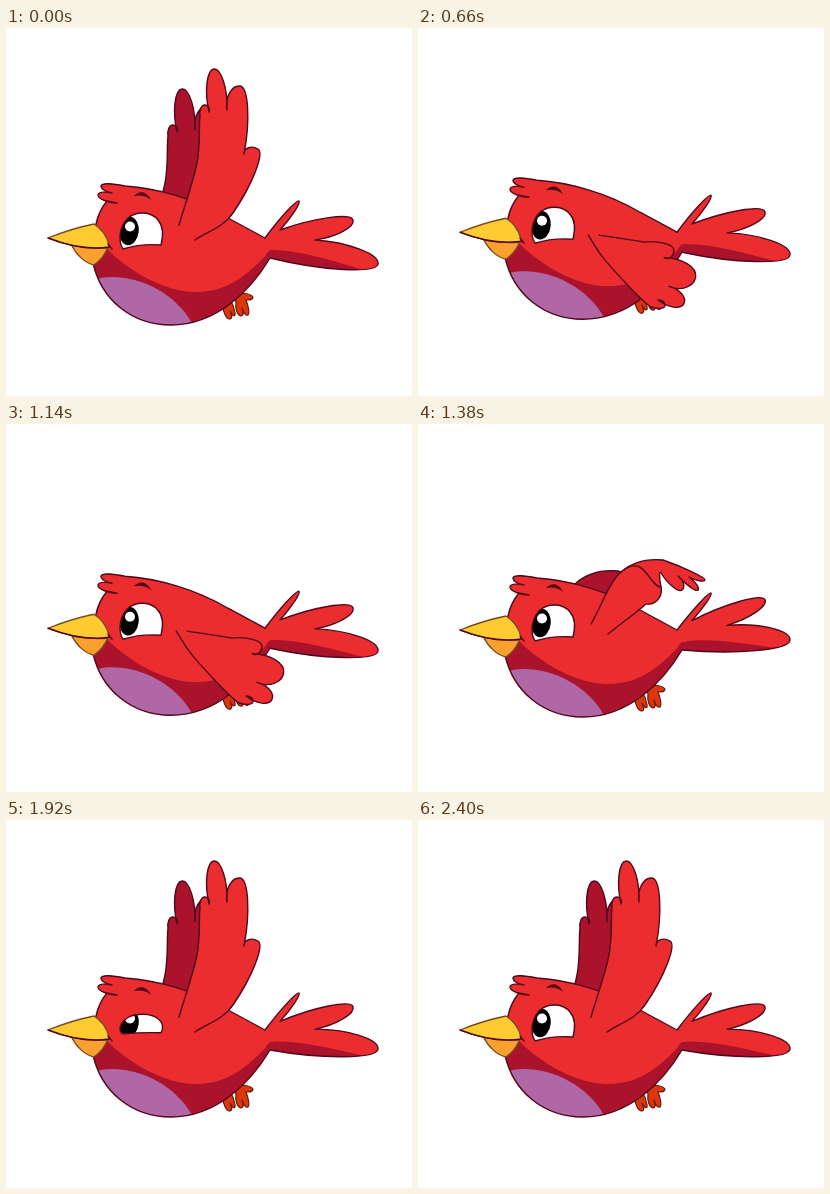
Animation of 406x368 px, one loop 2.43 s. Source, as an HTML page:

```html
<!DOCTYPE html>
<html lang="en">
<head>
<meta charset="utf-8">
<title>Flying bird</title>
<style>
html, body { margin: 0; width: 100%; height: 100%; overflow: hidden; background: #fff; }
svg { display: block; width: 100vw; height: 100vh; }
.line { stroke: #50081c; stroke-width: 1.4; stroke-linejoin: round; stroke-linecap: round; }
.red { fill: #eb2d2f; }
.dark { fill: #ab122c; }
.none { fill: none; }
.beak { stroke: #75491f; stroke-width: 1.3; stroke-linejoin: round; }
.foot { fill: #dc360c; stroke: #64180c; stroke-width: 1.2; stroke-linejoin: round; }
</style>
</head>
<body>
<svg viewBox="0 0 406 368">
  <defs>
    <path id="torso" d="M264 230C245 262 211 297 165 297C125 297 95 271 87 235L90 196C92 186 96 179 101 173
      L111 175C103 175 92 171 92 167C92 164 100 163 106 165C100 164 95 161 95 158C96 154 108 156 119 158
      C151 160 190 171 222 190L259 210"/>
    <clipPath id="inBody"><use href="#torso"/></clipPath>
    <clipPath id="inTail"><path class="tail"/></clipPath>
    <clipPath id="inEye"><path class="eye"/></clipPath>
  </defs>
  <path id="far" class="dark line"/>
  <g id="bird">
    <path class="foot" d="M225 274C220 276 217 279 217 281C218 284 219 290 223 291C227 291 226 287 224 283C226 286 227 289 229 287C230 284 227 280 227 277Z"/>
    <path class="foot" d="M229 268C235 264 244 265 247 269C247 272 244 272 240 272C242 277 244 285 242 287C239 288 237 284 236 280C237 285 238 288 235 288C231 287 229 280 230 275Z"/>
    <path class="tail red"/>
    <path id="tailShade" class="dark" clip-path="url(#inTail)"/>
    <use href="#torso" class="red"/>
    <g clip-path="url(#inBody)">
      <path class="dark" d="M101 221C125 245 160 264 190 264C225 264 245 243 264 223V300H80L85 233Z"/>
      <path fill="#af68a5" d="M90 251C120 243 167 259 187 297L160 305L85 280Z"/>
    </g>
    <path class="red" d="M252 212L259 210L266 209L268 222L262 223Z"/>
    <path class="dark" d="M260 226L264 222L269 222L268 230L264 230Z"/>
    <use href="#torso" class="none line"/>
    <path class="tail none line"/>
    <path class="beak" fill="#f9a02e" d="M65 216C70 227 79 235 88 237C95 232 99 227 102 219Z"/>
    <path class="beak" fill="#ffcb33" d="M42 210C57 204 73 199 88 196C96 201 101 209 103 217Q103 219 101 220C80 222 60 217 42 210Z"/>
    <path class="none line" d="M42 210C60 217 83 222 103 219M102 216L106 221"/>
    <path class="eye" fill="#fff"/>
    <g clip-path="url(#inEye)">
      <ellipse cx="123" cy="203" rx="9.700" ry="14.300" transform="rotate(6 123 203)"/>
      <circle cx="124" cy="198.500" r="5" fill="#fff"/>
    </g>
    <path class="eye none line"/>
    <path id="brow" fill="#50081c" d="M128 168C133 162 141 163 145 172C139 167 134 167 128 168Z"/>
  </g>
  <path id="near" class="red line"/>
  <path id="fold" class="none line"/>
</svg>
<script>
const LOOP = 2430, STEP = 30, FLAP = 480;
const SHOULDER = [180, 205];
const $ = id => document.getElementById(id);
const add = (a, b, k = 1) => [a[0] + b[0] * k, a[1] + b[1] * k];
const sub = (a, b) => add(a, b, -1);
const setAll = (name, d) =>
  document.querySelectorAll("." + name).forEach(e => e.setAttribute("d", d));
const show = p => p.map(n => n.toFixed(2)).join(" ");
const move = p => "M" + show(p);
const curve = (...pts) => "C" + pts.map(show).join(" ");

function rotate([x, y], deg) {
  const r = deg * Math.PI / 180, c = Math.cos(r), s = Math.sin(r);
  return [x * c - y * s, x * s + y * c];
}

// Rounded feather from root a over the tip to root b
function feather(a, tip, b) {
  const axis = sub(tip, add(a, sub(b, a), 0.5)), len = Math.hypot(...axis) || 1;
  const side = [-axis[1] / len, axis[0] / len], root = sub(b, a);
  const w = Math.max(-10, Math.min(10, 0.4 * (side[0] * root[0] + side[1] * root[1])));
  const half = [side[0] * w, side[1] * w];
  return curve(sub(add(a, sub(tip, a), 0.5), half), sub(tip, half), tip) +
    curve(add(tip, half), add(add(b, sub(tip, b), 0.5), half), b);
}

// Wing points: front, elbow, wrist, then tips and gaps in turn, heel, back
const up = [[173, 197], [191, 135], [194, 88], [199, 77], [203, 84], [208, 41],
  [221, 82], [234, 58], [238, 126], [252, 121], [227, 185], [189, 212]];
const swept = [[168, 210], [185, 222], [262, 219], [273, 207], [261, 212], [270, 185],
  [253, 199], [257, 167], [235, 194], [232, 187], [226, 202], [186, 216]];
const bent = [[173, 200], [203, 148], [245, 136], [287, 156], [271, 153], [280, 166],
  [260, 152], [264, 166], [243, 149], [243, 163], [228, 180], [190, 210]];
const down = up.map(([x, y]) => [x, SHOULDER[1] - 0.87 * (y - SHOULDER[1])]);

// A pose keeps its points unturned, so that the wing swings instead of shrinking
const pose = (at, pts, turn, rise, far) => ({
  at, v: [turn, rise, ...far, ...pts.flatMap(p => rotate(sub(p, SHOULDER), -turn))]
});
const poses = [
  pose(0, up, -80, 0, [-32, 20]),
  pose(120, swept, 5, -4, [-35, 5]),
  pose(255, down, 80, -7, [-32, -17]),
  pose(420, bent, -30, -4, [-45, 11])
];

// Smooth periodic interpolation between poses
function blend(keys, t) {
  const n = keys.length;
  const key = i => {
    const turn = Math.floor(i / n), k = keys[i - turn * n];
    return { at: k.at + turn * FLAP, v: k.v };
  };
  let i = n - 1;
  while (keys[i].at > t) i--;
  const [a, b, c, d] = [i - 1, i, i + 1, i + 2].map(key);
  const h = c.at - b.at, u = (t - b.at) / h, u2 = u * u, u3 = u2 * u;
  return b.v.map((p, j) => {
    const m0 = (c.v[j] - a.v[j]) / (c.at - a.at) * h;
    const m1 = (d.v[j] - p) / (d.at - b.at) * h;
    return (2 * u3 - 3 * u2 + 1) * p + (u3 - 2 * u2 + u) * m0 +
      (3 * u2 - 2 * u3) * c.v[j] + (u3 - u2) * m1;
  });
}

function wingPath(pts) {
  const [front, elbow, wrist, tip] = pts;
  const [last, heel, back] = pts.slice(-3);
  const bend = sub(wrist, front);
  let d = move(front) +
    curve(add(front, sub(elbow, front), 1 / 3), add(elbow, bend, -1 / 6), elbow) +
    curve(add(elbow, bend, 1 / 6), add(wrist, sub(tip, elbow), -1 / 6), wrist);
  for (let i = 2; i < 10; i += 2) d += feather(pts[i], pts[i + 1], pts[i + 2]);
  return d + curve(add(heel, sub(back, last), 1 / 6), add(back, sub(heel, back), 1 / 3), back);
}

function drawWings(p) {
  const [turn, rise, farX, farY, ...flat] = blend(poses, p);
  const pts = [];
  for (let i = 0; i < flat.length; i += 2)
    pts.push(add(SHOULDER, rotate([flat[i], flat[i + 1]], turn)));
  const d = wingPath(pts), elbow = pts[1], tip = pts[9];
  $("near").setAttribute("d", d);
  $("far").setAttribute("d", d);
  $("far").setAttribute("transform", `translate(${farX} ${farY})`);
  $("fold").setAttribute("d", move(elbow) + curve(add(elbow, [24, -20]), add(tip, [-12, 0]), tip));
  $("fold").style.display = p > 360 && p < 450 ? "" : "none";
  $("bird").setAttribute("transform", `translate(0 ${rise})`);
}

function drawTail(k) {
  const swing = (x, y) => [x, y + k * Math.max(0, x - 264) / 108];
  const top = [259, 210], gap = swing(274, 202), notch = swing(309, 212), base = [264, 230];
  const tip = swing(372, 236);
  setAll("tail", move(top) + feather(top, [293, 173], gap) +
    feather(gap, swing(347, 192), notch) + feather(notch, tip, base));
  $("tailShade").setAttribute("d", move([262, 222]) +
    curve(swing(292, 221), swing(330, 234), swing(362, 243)) +
    "L" + show(swing(360, 260)) + "L262 250Z");
}

// shut runs from 0 (open) to 1 (closed)
function drawEye(shut) {
  const mid = 211;
  const lid = (x, y) => [x, mid + (y - mid) * (y < mid ? 1 - shut : Math.max(0, 1 - 2 * shut))];
  const left = lid(117, 221), right = lid(155, 217), crown = lid(122, 190), brim = lid(152, 192);
  setAll("eye", move(left) + curve(lid(112, 213), lid(113, 199), crown) +
    curve(lid(130, 183), lid(145, 183), brim) + curve(lid(158, 199), lid(157, 209), right) +
    curve(lid(142, 216), lid(130, 217), left) + "Z");
  $("brow").setAttribute("transform", `translate(0 ${Math.min(3, 9 * shut)})`);
}

function draw(t) {
  const p = t % FLAP;
  drawWings(p);
  const settle = 7 * Math.max(0, 1 - t / 120);
  drawTail(-9.6 + 11.9 * Math.sin(p / FLAP * Math.PI * 2 + 0.22) + settle);
  drawEye(Math.max(0, 1 - Math.abs(t - 1965) / 70));
}

const start = performance.now();
function tick() {
  const t = (performance.now() - start) % LOOP;
  draw(Math.floor(t / STEP) * STEP);
  requestAnimationFrame(tick);
}
draw(0);
requestAnimationFrame(tick);
</script>
</body>
</html>
```
